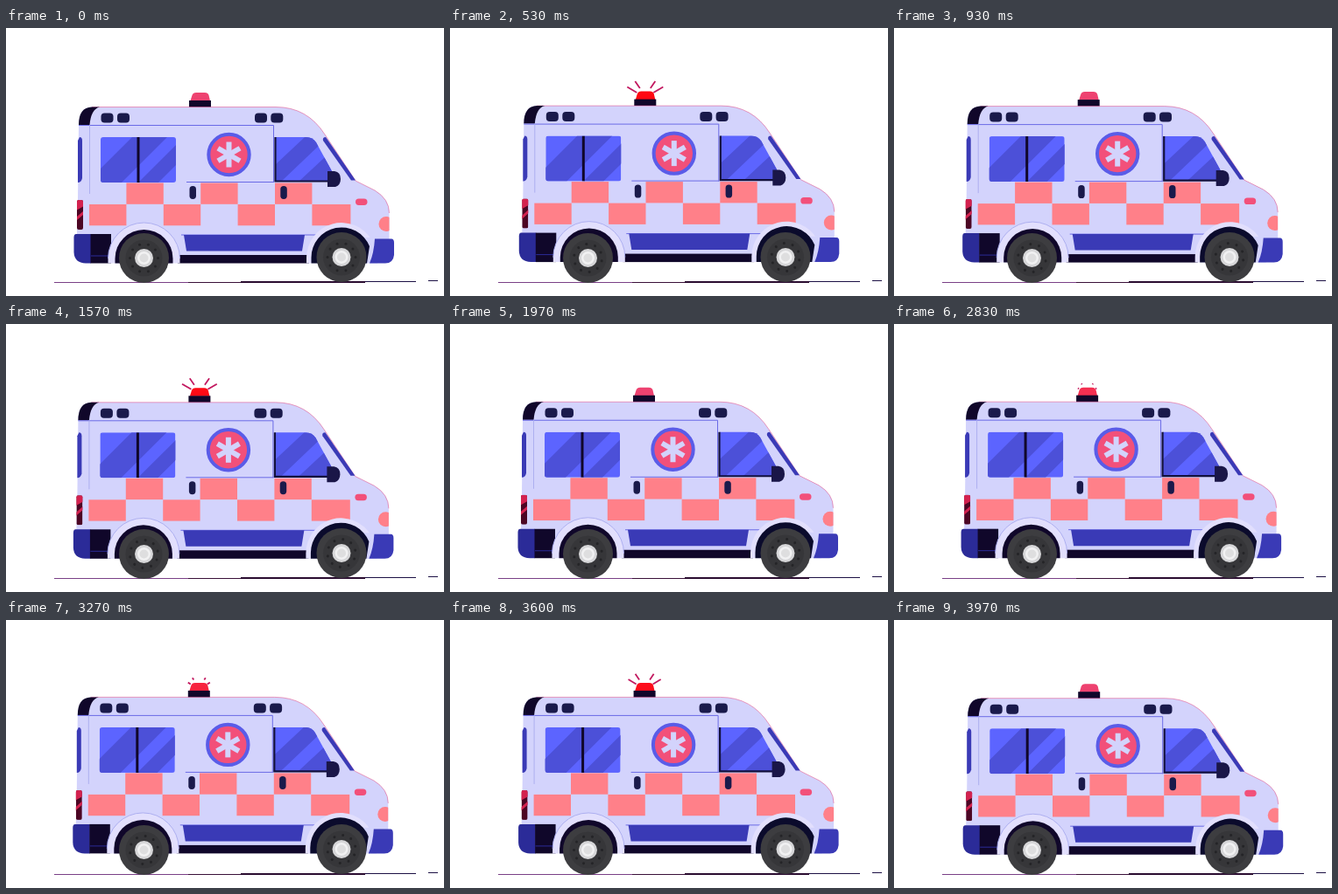
Write an HTML page that moves like this. It is 500 px wide and 307 px high and loops after 4010 ms.

```html
<!DOCTYPE html>
<html lang="en">
<head>
<meta charset="utf-8">
<title>Ambulance</title>
<style>
  html, body { margin: 0; width: 100%; height: 100%; overflow: hidden; background: #fff; }
  svg { display: block; width: 100%; height: 100%; }
  .body { fill: #d3d3fc; }
  .ink { fill: #10072a; }
  .navy { fill: #1a1a4b; }
  .blue { fill: #3a3ab6; }
  .deep { fill: #2b2b98; }
  .glass { fill: #5c64ff; }
  .shade { fill: #4c50d8; }
  .check { fill: #ff8089; }
  .arch { fill: #e2dffd; }
  .seam { fill: none; stroke: #6a6ae6; stroke-width: 1; }
  .faint { fill: none; stroke: #a9abef; stroke-width: .9; }
  #rays { stroke: #c2185f; stroke-width: 1.8; fill: none; }
</style>
</head>
<body>
<svg viewBox="0 0 500 307">
  <defs>
    <clipPath id="side"><rect x="108" y="125" width="86" height="52" rx="3"/></clipPath>
    <clipPath id="door"><path id="pane" d="M308 125H343Q350 125 354 131L372 164V176H308Z"/></clipPath>
    <clipPath id="tail"><rect x="81" y="197" width="7" height="34" rx="2"/></clipPath>
    <path id="shell" d="M83 111Q83 91 98 90.5H308Q344 90.5 364 122L399 175L421 186Q437.5 196 437.5 212V243H420V269H97L77.500 240L81 236L82 196Z"/>
    <clipPath id="hull"><use href="#shell"/></clipPath>
    <g id="wheel">
      <circle r="28.500" fill="#3d3d40"/>
      <circle r="21" fill="#363639"/>
      <g class="spin" fill="#242427"></g>
      <circle r="10.500" fill="#d6d6d8"/>
      <circle r="7.500" fill="#f1f1f2"/>
      <circle r="5" fill="#dededf"/>
    </g>
  </defs>

  <g fill="none" stroke="#1c1044">
    <path d="M55 291.500H208" stroke="#7a3f86"/>
    <path d="M208 291.500H268" stroke="#3a1038"/>
    <path d="M268 291H410" stroke="#2a0c30" stroke-width="2"/>
    <path d="M410 290.500H468M482 289.500H493"/>
  </g>

  <g id="van">
    <g id="rays"></g>
    <path id="dome" d="M210.500 83.500L212.500 77Q213.500 74 217 74H227Q230.500 74 231.500 77L233 83.500Z"/>
    <rect class="ink" x="209" y="83" width="25" height="8"/>

    <use href="#shell" class="body"/>
    <path d="M98 90.500H308Q344 90.500 364 122L399 175L421 186Q437.500 196 437.500 212" fill="none" stroke="#e0518a" stroke-width=".8" opacity=".7"/>
    <path class="ink" d="M83 111Q83 91 98 90.500H107Q97 93 95.500 111Z"/>
    <path class="seam" d="M83 111.500H305.500V177M206 176.500H306M200 237H354"/>
    <path class="faint" d="M95.500 111V190"/>
    <g id="vents" class="navy"></g>

    <path class="blue" d="M84 125Q87 125 87 129V172Q86 177 82 177V129Z"/>
    <g clip-path="url(#side)">
      <rect class="glass" x="108" y="125" width="86" height="52"/>
      <path class="shade" d="M92 177L144 125H184L132 177ZM151 177L203 125H226L174 177Z"/>
      <rect class="ink" x="149.500" y="125" width="3" height="52"/>
    </g>
    <use href="#pane" class="glass"/>
    <path class="shade" clip-path="url(#door)" d="M308 156L341 125H360V132L314 176H308ZM334 176L364 148L380 176Z"/>
    <path d="M307.500 125V175.500H372" fill="none" stroke="#12103c" stroke-width="2.200"/>
    <path d="M367 164H375Q382 165 382 173Q382 180 376 182H367Z" fill="#1a1648"/>
    <path class="blue" d="M362 129Q361 125 365 125L399 174.500H394Z"/>

    <circle cx="254.500" cy="145" r="23.200" fill="#f2507a" stroke="#5a5ce8" stroke-width="4"/>
    <g id="star" class="body" transform="translate(254.500 145)"></g>

    <g id="checks" class="check"></g>
    <g class="navy">
      <rect x="209.500" y="181" width="7.500" height="15" rx="3.700"/>
      <rect x="313.300" y="181" width="7.500" height="15" rx="3.700"/>
    </g>
    <rect x="399" y="195.500" width="13.500" height="7.500" rx="3.700" fill="#f2507a"/>
    <circle class="check" cx="434" cy="224.500" r="8.500" clip-path="url(#hull)"/>
    <g clip-path="url(#tail)">
      <rect x="81" y="197" width="7" height="34" fill="#4c0624"/>
      <path d="M80 197H89V204L80 209ZM80 217L89 209V213L80 221Z" fill="#d3224f"/>
    </g>

    <path class="deep" d="M80 236H97V269.500H91Q78 269 77.500 257V240Q77.500 236 80 236Z"/>
    <path class="ink" d="M96.500 236H120V269.500H96.500Z"/>
    <path d="M97 261H120" stroke="#2b2b98" stroke-width="1"/>
    <path class="blue" d="M203 237H341L338 255.500H206Z"/>
    <rect class="ink" x="196" y="260" width="150" height="9.500"/>

    <path class="arch" d="M116.500 269.500V264A41 41 0 0 1 198.500 264V269.500Z"/>
    <path class="faint" d="M116.500 264A41 41 0 0 1 198.500 264"/>
    <path class="ink" d="M124.500 269.500V264A33 33 0 0 1 190.500 264V269.500Z"/>
    <path class="arch" d="M343 269.500V263A40 40 0 0 1 417.600 243L413 269.500Z"/>
    <path class="body" d="M408 240H424V269.500H408Z"/>
    <path d="M348.500 269.500V263A34.500 34.500 0 0 1 415 250L412 269.500Z" fill="#0b0b2c"/>
    <path class="blue" d="M421 241.500H440Q443 241.500 443 246V260Q442 269.500 433 269.500H415Q420 258 421 241.500Z"/>
  </g>

  <use href="#wheel" x="157.500" y="263.500"/>
  <use href="#wheel" x="383" y="262.500"/>
</svg>

<script>
const LOOP = 4010, STEPS = 120, TAU = Math.PI * 2;
const $ = s => document.querySelector(s);

function add(parent, tag, attrs) {
  const el = document.createElementNS("http://www.w3.org/2000/svg", tag);
  for (const key in attrs) el.setAttribute(key, attrs[key]);
  return parent.appendChild(el);
}

for (const x of [108.5, 127, 284, 302.3])
  add($("#vents"), "rect", { x, y: 97.5, width: 14, height: 11, rx: 4 });
for (let i = 0; i < 7; i++)
  add($("#checks"), "rect", { x: 95 + i * 42.4, y: i % 2 ? 177.5 : 202, width: i === 6 ? 44 : 42.4, height: 24.3 });
for (let i = 0; i < 3; i++)
  add($("#star"), "rect", { x: -3, y: -14.5, width: 6, height: 29, transform: `rotate(${i * 60})` });
for (let i = 0; i < 10; i++) {
  const a = i / 10 * TAU;
  add($(".spin"), "circle", { cx: 16 * Math.cos(a), cy: 16 * Math.sin(a), r: 1.5 });
}

// Start and tip of the two rays on one side, relative to the lamp axis
const raySpec = [[6, 70.5, 11.5, 62.5], [9.5, 75.5, 20.5, 69]];
const rays = [-1, 1].flatMap(side => raySpec.map(spec => ({ side, spec, el: add($("#rays"), "path", {}) })));

// Resting poses of the shaking body: step, x, y
const poses = [[0, 0, 0], [16, 1.3, -1.4], [28, .7, -.9], [47, -.6, -.7],
               [71, .6, -1.8], [98, -1.2, -2.1], [119, 1.2, -.8], [120, 0, 0]];

function shake(step) {
  let i = 0;
  while (step >= poses[i + 1][0]) i++;
  const [s0, x0, y0] = poses[i], [s1, x1, y1] = poses[i + 1];
  const span = s1 - s0, u = (step - s0) / span;
  const wave = size => Math.sin(Math.PI * u * Math.round(span / size));
  return [x0 + (x1 - x0) * u + .7 * wave(4), y0 + (y1 - y0) * u + .7 * wave(3)];
}

const mix = (a, b, k) => a + (b - a) * k;

function draw(now) {
  const t = now % LOOP;
  const step = Math.floor(t / LOOP * STEPS + .25) % STEPS;
  const [x, y] = shake(step);
  $("#van").setAttribute("transform", `translate(${x} ${y})`);
  $(".spin").setAttribute("transform", `rotate(${step * 12})`);

  const phase = step * 4 / STEPS % 1;
  const glow = Math.max(0, Math.min(1, (.32 - Math.abs(phase - .51)) / .28));
  const heat = Math.sqrt(glow);
  $("#dome").setAttribute("fill", `rgb(${mix(238, 255, heat)},${mix(66, 8, heat)},${mix(112, 18, heat)})`);
  for (const { side, spec: [sx, sy, ex, ey], el } of rays)
    el.setAttribute("d", glow ? `M${221.5 + side * sx} ${sy}L${221.5 + side * mix(sx, ex, glow)} ${mix(sy, ey, glow)}` : "");
}

function tick() {
  draw(performance.now());
  requestAnimationFrame(tick);
}
tick();
</script>
</body>
</html>
```
